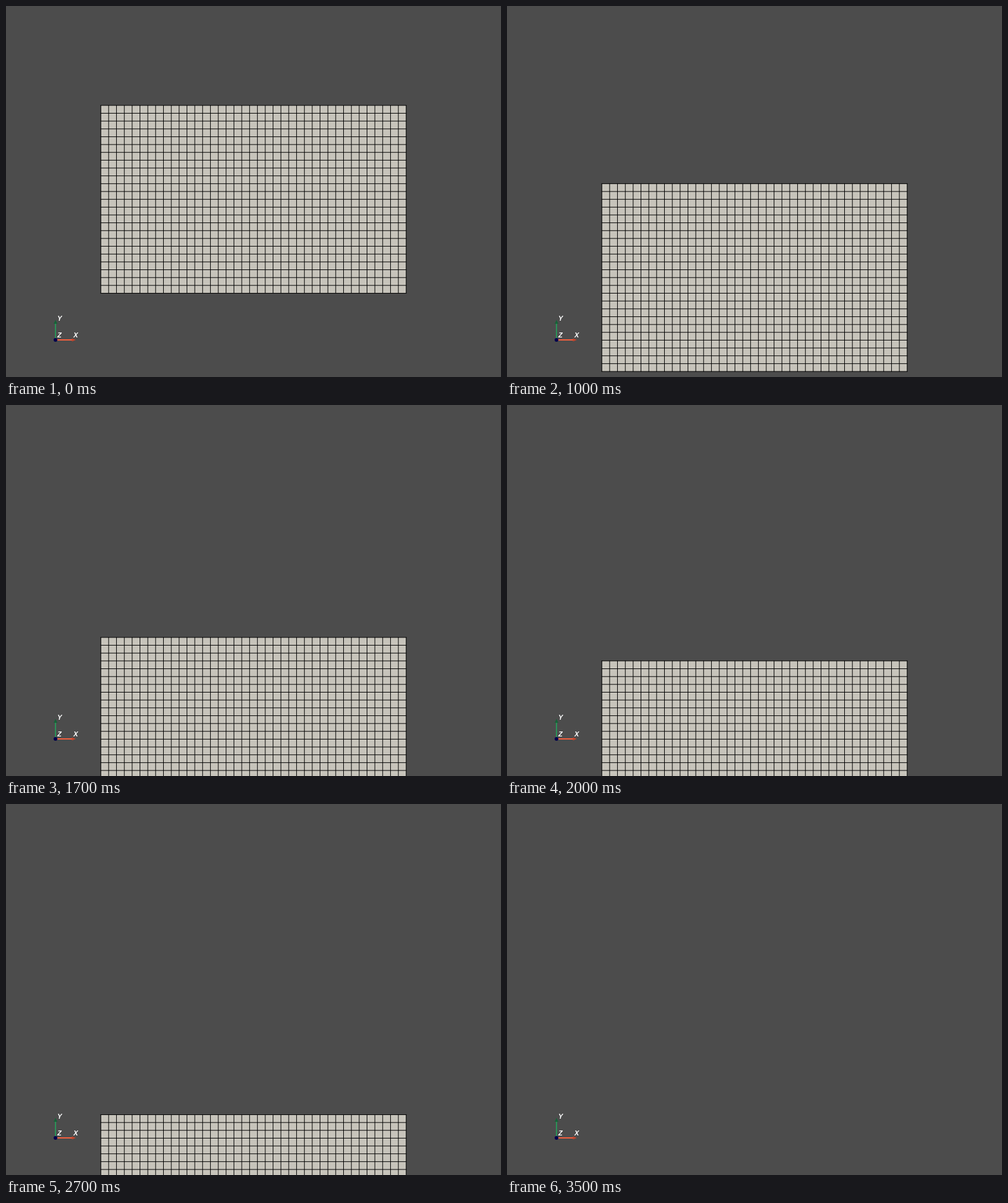
Recreate the animation shown at these times as an HTML page with a canvas. Size 800 px wide and 600 px high, loop 10000 ms.

```html
<!DOCTYPE html>
<html lang="en">
<head>
<meta charset="utf-8">
<title>Falling grid</title>
<style>
  html, body { margin: 0; width: 100%; height: 100%; overflow: hidden; background: #4c4c4c; }
  canvas { display: block; }
</style>
</head>
<body>
<canvas id="stage" width="800" height="600"></canvas>
<script>
const ctx = document.getElementById('stage').getContext('2d');
const LOOP = 10000, STEP = 100;
const COLS = 39, ROWS = 24, CELL = 493.5 / COLS;
const LEFT = 400 - COLS * CELL / 2, TOP = 300 - 11 * CELL;

function fill(color, x, y, w, h) {
  ctx.fillStyle = color;
  ctx.fillRect(x, y, w, h);
}

function shape(color, points) {
  ctx.fillStyle = color;
  ctx.beginPath();
  points.forEach(([x, y]) => ctx.lineTo(x, y));
  ctx.fill();
}

function drawGrid(top) {
  const w = COLS * CELL, h = ROWS * CELL;
  fill('#c7c4bb', LEFT, top, w, h);
  ctx.strokeStyle = '#000';
  ctx.lineWidth = 1;
  ctx.beginPath();
  for (let c = 0; c <= COLS; c++) {
    ctx.moveTo(LEFT + c * CELL, top - 0.5);
    ctx.lineTo(LEFT + c * CELL, top + h + 0.5);
  }
  for (let r = 0; r <= ROWS; r++) {
    ctx.moveTo(LEFT - 0.5, top + r * CELL);
    ctx.lineTo(LEFT + w + 0.5, top + r * CELL);
  }
  ctx.stroke();
}

function drawAxes() {
  fill('#2b9258', 79, 513, 2, 26);
  shape('#176238', [[77, 514], [80, 507.5], [83, 514]]);
  fill('#f5603f', 82, 539, 26, 2);
  shape('#c2452c', [[106.5, 537.5], [113, 540], [106.5, 542.5]]);
  ctx.fillStyle = '#00004c';
  ctx.beginPath();
  ctx.arc(80, 540, 3, 0, 2 * Math.PI);
  ctx.fill();
  ctx.fillStyle = '#fff';
  ctx.font = 'italic bold 11px "Liberation Sans", Arial, sans-serif';
  ctx.fillText('Y', 83, 509);
  ctx.fillText('Z', 83, 536);
  ctx.fillText('X', 109, 536);
}

// The grid drops by one cell per step until it has left the stage.
function draw(now) {
  const step = Math.floor(now % LOOP / STEP);
  fill('#4c4c4c', 0, 0, 800, 600);
  drawGrid(TOP + step * CELL);
  drawAxes();
  requestAnimationFrame(draw);
}
draw(performance.now());
</script>
</body>
</html>
```
